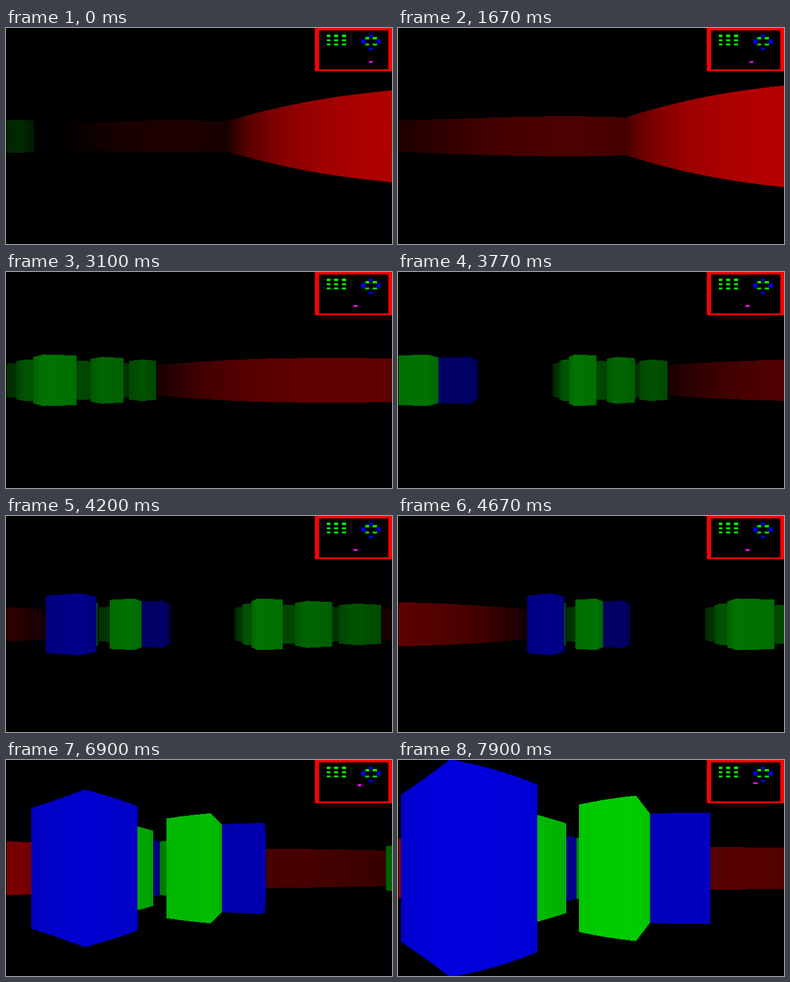
An HTML page with a canvas for the animation above (8 s loop, 640 by 360 pixels).

```html
<!DOCTYPE html>
<html>
<head>
<meta charset="utf-8">
<style>
html, body { margin: 0; width: 100%; height: 100%; overflow: hidden; background: #000; }
canvas { display: block; }
</style>
</head>
<body>
<canvas id="view" width="640" height="360"></canvas>
<script>
const W = 640, H = 360, LOOP = 8000, SIZE = 20, DEPTH = 15;
const MAP_X = W * 0.8, CELL_W = W / 5 / SIZE, CELL_H = H / 5 / SIZE;
const ctx = document.getElementById('view').getContext('2d');

// Red border, a square of green pillars and a ring of green and blue ones
function wallAt(x, y) {
  if (x % (SIZE - 1) === 0 || y % (SIZE - 1) === 0) return 'R';
  const odd = v => v % 2 === 1 && v >= 3 && v <= 7;
  if (odd(x) && odd(y)) return 'G';
  const side = Math.abs(x - 14);
  if (side === 0 && (y === 3 || y === 9)) return 'B';
  if (side === 1 && (y === 4 || y === 7)) return 'G';
  if (side === 2 && (y === 5 || y === 6)) return 'B';
  return '';
}
const grid = Array.from({ length: SIZE }, (_, y) =>
  Array.from({ length: SIZE }, (_, x) => wallAt(x, y)));

const shade = (kind, v) =>
  `rgb(${kind === 'R' ? v : 0},${kind === 'G' ? v : 0},${kind === 'B' ? v : 0})`;

// Walks are in cells, turns in degrees; each leg moves in even time steps
const start = { x: 14.2, y: 15.32, deg: 97.4 };
const legs = [
  { walk: 3.827, from: 370, to: 2100, steps: 26 },
  { turn: -117.4, from: 2370, to: 4670, steps: 35 },
  { walk: 5.29, from: 5000, to: 7230, steps: 31 },
  { turn: -8.6, from: 7670, to: 7900, steps: 3 }
];

// Walks speed up a little, turns slow down a little
const bend = (u, k) => u + k * u * (1 - u);

function poseAt(t) {
  let { x, y, deg } = start;
  for (const { walk = 0, turn = 0, from, to, steps } of legs) {
    if (t < from) break;
    const done = Math.floor((t - from) / (to - from) * (steps - 1) + 1e-6) + 1;
    const u = Math.min(1, done / steps), a = deg * Math.PI / 180;
    const dist = walk * bend(u, -0.12);
    x -= Math.sin(a) * dist;
    y -= Math.cos(a) * dist;
    deg += turn * bend(u, 0.18);
  }
  return { x, y, deg };
}

// Follows a unit ray through the grid to the first wall
function cast(px, py, dx, dy) {
  let x = Math.floor(px), y = Math.floor(py), dist = 0;
  const sx = Math.sign(dx), sy = Math.sign(dy);
  const ix = Math.abs(1 / dx), iy = Math.abs(1 / dy);
  let tx = (dx > 0 ? x + 1 - px : px - x) * ix;
  let ty = (dy > 0 ? y + 1 - py : py - y) * iy;
  while (!grid[y][x]) {
    if (tx < ty) { dist = tx; tx += ix; x += sx; }
    else { dist = ty; ty += iy; y += sy; }
  }
  return [dist, grid[y][x]];
}

// Fills a block of map cells, from (x0, y0) up to (x1, y1)
function drawCells(x0, y0, x1, y1, color) {
  const edgeX = x => Math.ceil(MAP_X + x * CELL_W);
  const edgeY = y => Math.floor(y * CELL_H) + 1;
  ctx.fillStyle = color;
  ctx.fillRect(edgeX(x0), edgeY(y0), edgeX(x1) - edgeX(x0), edgeY(y1) - edgeY(y0));
}
const drawCell = (x, y, color) => drawCells(x, y, x + 1, y + 1, color);

function drawWalls({ x, y, deg }) {
  const a = deg * Math.PI / 180, s = Math.sin(a), c = Math.cos(a);
  for (let col = 1; col < W; col++) {
    const u = (col + 0.5) / (W / 2) - 1, len = Math.hypot(1, u);
    const [d, kind] = cast(x, y, (-s - c * u) / len, (-c + s * u) / len);
    if (d >= DEPTH) continue;
    const top = Math.floor(H / 2 - H / d) + 2;
    ctx.fillStyle = shade(kind, Math.round(255 * (1 - d / DEPTH)));
    ctx.fillRect(col, top, 1, H + 1 - 2 * top);
  }
}

function drawMap({ x, y }) {
  ctx.fillStyle = '#f00';
  ctx.fillRect(MAP_X, 0, W / 5, H / 5);
  drawCells(1, 1, SIZE - 1, SIZE - 1, '#000');
  grid.forEach((row, cy) => row.forEach((kind, cx) => {
    if (kind && kind !== 'R') drawCell(cx, cy, shade(kind, 255));
  }));
  drawCell(Math.floor(x), Math.floor(y), '#f0f');
}

function tick() {
  const pose = poseAt(performance.now() % LOOP);
  ctx.fillStyle = '#000';
  ctx.fillRect(0, 0, W, H);
  drawWalls(pose);
  drawMap(pose);
  requestAnimationFrame(tick);
}
tick();
</script>
</body>
</html>
```
